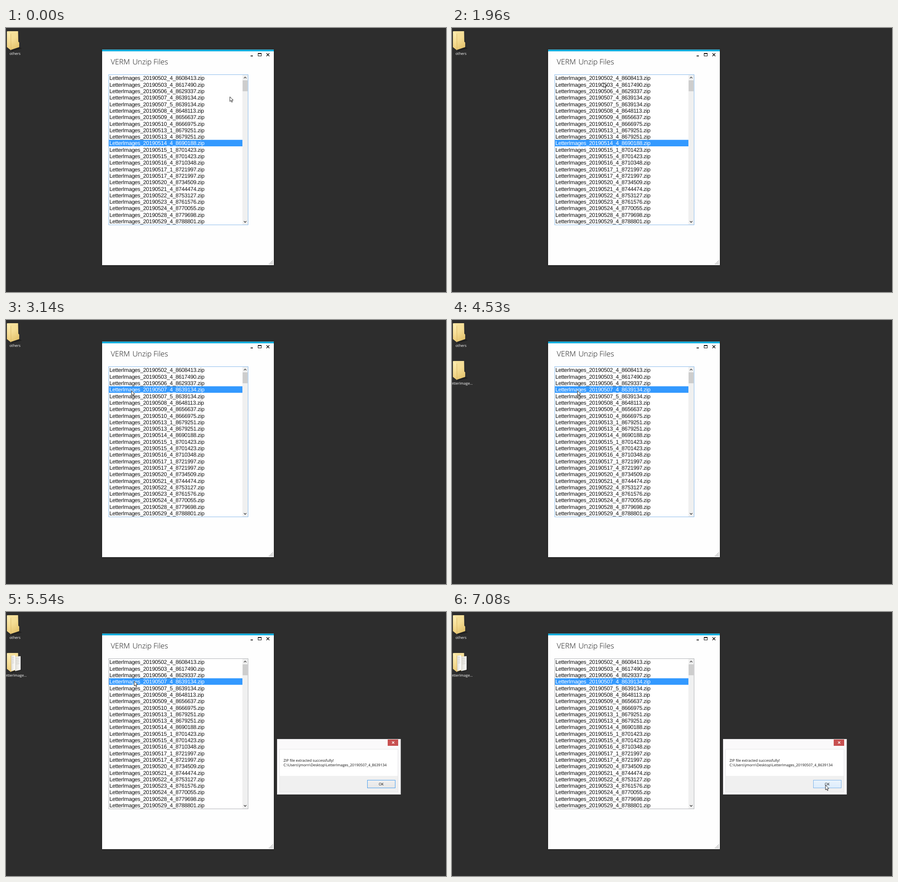
An HTML page with a canvas for the animation above (8000 ms loop, 966x580 px).

```html
<!DOCTYPE html>
<html lang="en">
<head>
<meta charset="utf-8">
<title>Unzip Files</title>
<style>
  html, body { margin: 0; width: 100%; height: 100%; overflow: hidden; background: #2d2d2d; }
  canvas { display: block; }
</style>
</head>
<body>
<canvas id="stage" width="966" height="580"></canvas>
<script>
const ctx = document.getElementById('stage').getContext('2d');
const LOOP = 8000;
const TICK = 77;
const DESK = '#2d2d2d';
const UI = '"Open Sans", "Noto Sans", sans-serif';
const LIST = '"Liberation Sans", Arial, sans-serif';
const SMALL = '8px ' + UI;
const ROW = 14.3;

const files = `0502_4_8608413 0503_4_8617490 0506_4_8629337 0507_4_8639134
  0507_5_8639134 0508_4_8648113 0509_4_8656637 0510_4_8666975 0513_1_8679251
  0513_4_8679251 0514_4_8690188 0515_1_8701423 0515_4_8701423 0516_4_8710348
  0517_1_8721997 0517_4_8721997 0520_4_8734509 0521_4_8744474 0522_4_8753127
  0523_4_8761576 0524_4_8770055 0528_4_8779698 0529_4_8788801`
  .split(/\s+/).map(s => `LetterImages_2019${s}.zip`);

const at = { select: 3140, folder: 4530, papers: 4680, writing: 5000, dialog: 5310, message: 5385, hover: 6940 };

// Pointer moves along Bezier paths; each begins where the last one ended.
const home = [491, 151];
const moves = [
  { from: 1040, to: 1200, path: [[485.5, 148]] },
  { from: 1420, to: 2190, path: [[440, 280], [332.6, 30.4], [277, 152]] },
  { from: 2270, to: 2360, path: [[275, 155.3]] },
  { from: 5460, to: 5610, path: [[284, 150.5]] },
  { from: 6070, to: 6850, path: [[330, 250], [825, 395.5], [825, 397]] },
  { from: 6940, to: 7080, path: [[819.5, 380.5]] }
];

function bezier(points, u) {
  if (points.length === 1) return points[0];
  const next = points.slice(1).map(([x, y], i) =>
    [points[i][0] + (x - points[i][0]) * u, points[i][1] + (y - points[i][1]) * u]);
  return bezier(next, u);
}

function pointerAt(t) {
  let pos = home;
  for (const { from, to, path } of moves) {
    if (t < from) break;
    // The screen refreshes in ticks, the first of them at the start of the move.
    const ticks = Math.round((to - from) / TICK);
    const k = Math.min(ticks, Math.floor((t - from) / (to - from) * ticks));
    pos = bezier([pos, ...path], (k + 1) / (ticks + 1));
  }
  return pos;
}

function rect(x, y, w, h, fill) {
  ctx.fillStyle = fill;
  ctx.fillRect(x, y, w, h);
}

function frame(x, y, w, h, color) {
  ctx.strokeStyle = color;
  ctx.lineWidth = 1;
  ctx.strokeRect(x + 0.5, y + 0.5, w - 1, h - 1);
}

function trace(points) {
  ctx.beginPath();
  points.forEach(p => ctx.lineTo(...p));
}

function poly(points, fill) {
  trace(points);
  ctx.closePath();
  ctx.fillStyle = fill;
  ctx.fill();
}

function line(points, color, width) {
  trace(points);
  ctx.strokeStyle = color;
  ctx.lineWidth = width;
  ctx.stroke();
}

function text(s, x, y, font, color, align = 'left') {
  ctx.font = font;
  ctx.fillStyle = color;
  ctx.textAlign = align;
  ctx.fillText(s, x, y);
}

function ramp(x0, y0, x1, y1, ...colors) {
  const g = ctx.createLinearGradient(x0, y0, x1, y1);
  colors.forEach((c, i) => g.addColorStop(i / (colors.length - 1), c));
  return g;
}

function cross(x, y, r, color, width) {
  line([[x - r, y - r], [x + r, y + r]], color, width);
  line([[x + r, y - r], [x - r, y + r]], color, width);
}

function chevron(y, dir) {
  line([[522.3, y + dir], [525, y - dir], [527.7, y + dir]], '#505050', 1.5);
}

function sheet(x, y, w, h, written) {
  poly([[x, y], [x + w, y - 1], [x + w, y + h - 3], [x, y + h]], ramp(x, 0, x + w, 0, '#dedcd4', '#fff'));
  if (!written) return;
  for (let row = y + 4; row < y + 18; row += 4)
    line([[x + 2, row], [x + w - 2, row - 0.5]], '#bbb9b2', 0.7);
}

function folder(y, papers, written) {
  ctx.save();
  ctx.translate(0, y);
  poly([[12, 42], [29, 35], [35, 39], [12, 45]], 'rgba(0,0,0,.25)');
  poly([[3, 1], [26.5, 1], [27, 24], [29, 26], [29, 36], [11, 42]],
    ramp(4, 0, 29, 36, '#f6e3a0', '#f5dd94', '#e3c26c'));
  if (papers) {
    sheet(11, 7, 9, 34, written);
    sheet(20, 9, 12, 32, written);
  }
  poly([[2, 1], [10, 7], [11, 43], [2, 36]], ramp(2, 2, 11, 42, '#fceeb6', '#f6df98', '#eccb78'));
  line([[10.5, 7], [11, 42]], '#cfa957', 0.7);
  ctx.restore();
}

function desktop(t) {
  rect(0, 0, 966, 580, DESK);
  folder(6);
  text('others', 19.8, 59, SMALL, '#fff', 'center');
  if (t < at.folder) return;
  folder(89, t >= at.papers, t >= at.writing);
  text('LetterImage...', 45.5, 142, SMALL, '#fff', 'right');
}

function mainWindow(t) {
  ctx.save();
  ctx.shadowColor = 'rgba(0,0,0,.4)';
  ctx.shadowBlur = 4;
  rect(211, 47.5, 377, 473.5, '#fefefe');
  ctx.restore();
  rect(211, 47.5, 377, 3.7, '#00aadc');

  rect(537, 60.5, 5, 1.8, '#111');
  frame(553, 55, 8, 7, '#111');
  rect(553, 55, 8, 2, '#111');
  cross(575, 58.7, 3.2, '#111', 1.4);

  const title = '300 16.2px ' + UI;
  text('VERM', 230, 80.3, title, '#111');
  text('Unzip Files', 277.7, 80.3, title, '#111');

  for (let r = 0; r < 4; r++)
    for (let c = 3 - r; c < 4; c++)
      rect(577.3 + c * 2.4, 510.5 + r * 2.4, 1.2, 1.2, '#777');

  listBox(t);
}

function listBox(t) {
  rect(225, 102, 307, 331, '#fff');
  const selected = t < at.select ? 10 : 3;
  rect(226, 102.7 + selected * ROW, 293, ROW, '#3399ff');
  ctx.letterSpacing = '-0.3px';
  files.forEach((name, i) =>
    text(name, 227.1, 114.4 + i * ROW, '12.2px ' + LIST, i === selected ? '#fff' : '#111'));
  ctx.letterSpacing = '0px';

  rect(519, 103, 12, 329, '#f0f0f0');
  rect(519.5, 115, 11, 24, '#cdcdcd');
  chevron(109.2, 1.4);
  chevron(425.7, -1.4);
  frame(225, 102, 307, 331, t < at.dialog ? '#8cbcec' : '#b2b4b8');
}

function dialog(t) {
  rect(595, 279, 271.5, 122, '#faf9fa');
  frame(595, 279, 271.5, 122, '#e4e4e6');
  rect(838, 280, 23, 14, '#c75050');
  cross(850, 286.8, 2.4, '#fff', 1.3);
  if (t < at.message) {
    rect(600.5, 301.5, 260.5, 94, DESK);
    return;
  }
  rect(600, 301, 261, 95, '#fff');
  rect(600, 360, 261, 36, '#f0f0f0');
  frame(600, 301, 261, 95, '#e6e6e8');
  text('ZIP file extracted successfully!', 609.3, 328.5, SMALL, '#111');
  text('C:\\Users\\jmorn\\Desktop\\LetterImages_20190507_4_8639134', 609.3, 339.3, SMALL, '#111');

  const hover = t >= at.hover;
  const face = hover ? ['#ebf4fc', '#dcecfc'] : ['#f0f0f0', '#e6e6e6'];
  rect(793, 369, 62, 18, ramp(0, 369, 0, 387, ...face));
  frame(793, 369, 62, 18, hover ? '#7eb4ea' : '#4a9fef');
  text('OK', 823.7, 381, SMALL, '#111', 'center');
}

function arrow(x, y) {
  ctx.save();
  ctx.translate(x + 0.5, y);
  poly([[0, 0], [0, 10.4], [2.4, 8.2], [4, 12], [5.7, 11.3], [4.1, 7.6], [7.3, 7.4]], '#fff');
  ctx.strokeStyle = '#111';
  ctx.lineWidth = 0.9;
  ctx.stroke();
  ctx.restore();
}

function draw(t) {
  desktop(t);
  mainWindow(t);
  if (t >= at.dialog) dialog(t);
  arrow(...pointerAt(t));
}

ctx.textRendering = 'geometricPrecision';
const start = performance.now();
function tick() {
  draw((performance.now() - start) % LOOP);
  requestAnimationFrame(tick);
}
tick();
</script>
</body>
</html>
```
